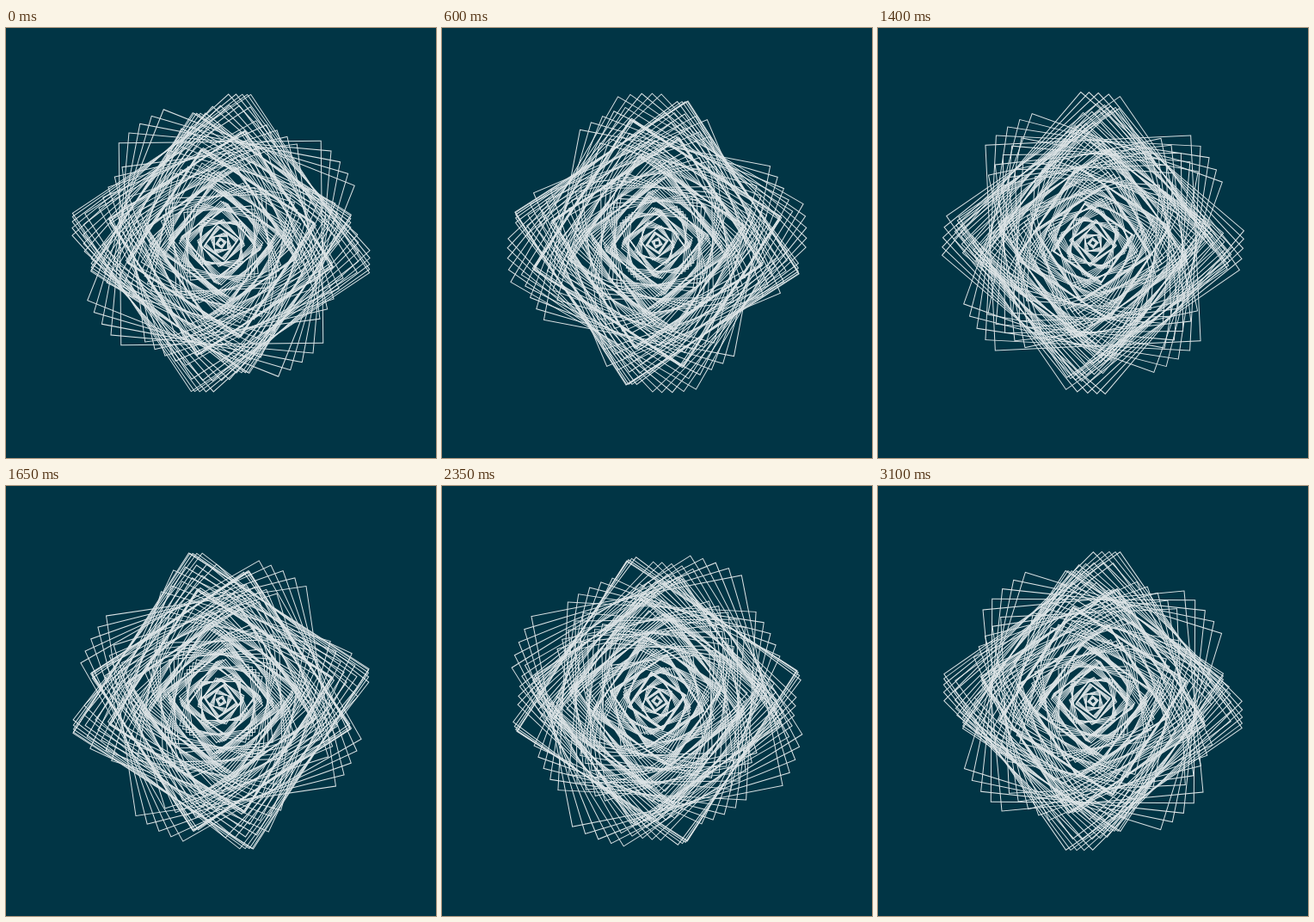
Recreate the animation shown at these times as an HTML page. Size 500 by 500 pixels, loop 3.15 s.

```html
<!DOCTYPE html>
<html lang="en">
<head>
<meta charset="utf-8">
<title>Rotating squares</title>
<style>
  html, body { margin: 0; width: 100%; height: 100%; overflow: hidden; background: #013545; }
  svg { display: block; width: 100%; height: 100%; }
  rect { fill: none; stroke: #dce3e5; stroke-width: 1; }
</style>
</head>
<body>
<svg viewBox="0 0 500 500"><g id="squares" transform="translate(250 250)"></g></svg>
<script>
const STEP_MS = 50;
const STEPS = 63;
const START_PHASE = 1.622;
const group = document.getElementById('squares');
const squares = [];

function addSquare(side) {
  const node = document.createElementNS('http://www.w3.org/2000/svg', 'rect');
  node.setAttribute('x', -side / 2);
  node.setAttribute('y', -side / 2);
  node.setAttribute('width', side);
  node.setAttribute('height', side);
  group.appendChild(node);
  squares.push({ node, side });
}

// Bands of five squares, one pixel apart, repeating every ten pixels.
for (let band = 0; band < 250; band += 10) {
  for (let k = 5; k < 10; k++) addSquare(band + k);
}

// Each square swings by one radian either way; smaller squares lag behind.
function draw(step) {
  for (const { node, side } of squares) {
    const angle = Math.sin(START_PHASE + 0.1 * (step + side));
    node.setAttribute('transform', `rotate(${angle * 180 / Math.PI})`);
  }
}

const start = performance.now();
function tick(now) {
  const elapsed = Math.max(0, now - start);
  draw(Math.floor(elapsed / STEP_MS) % STEPS);
  requestAnimationFrame(tick);
}
draw(0);
requestAnimationFrame(tick);
</script>
</body>
</html>
```
